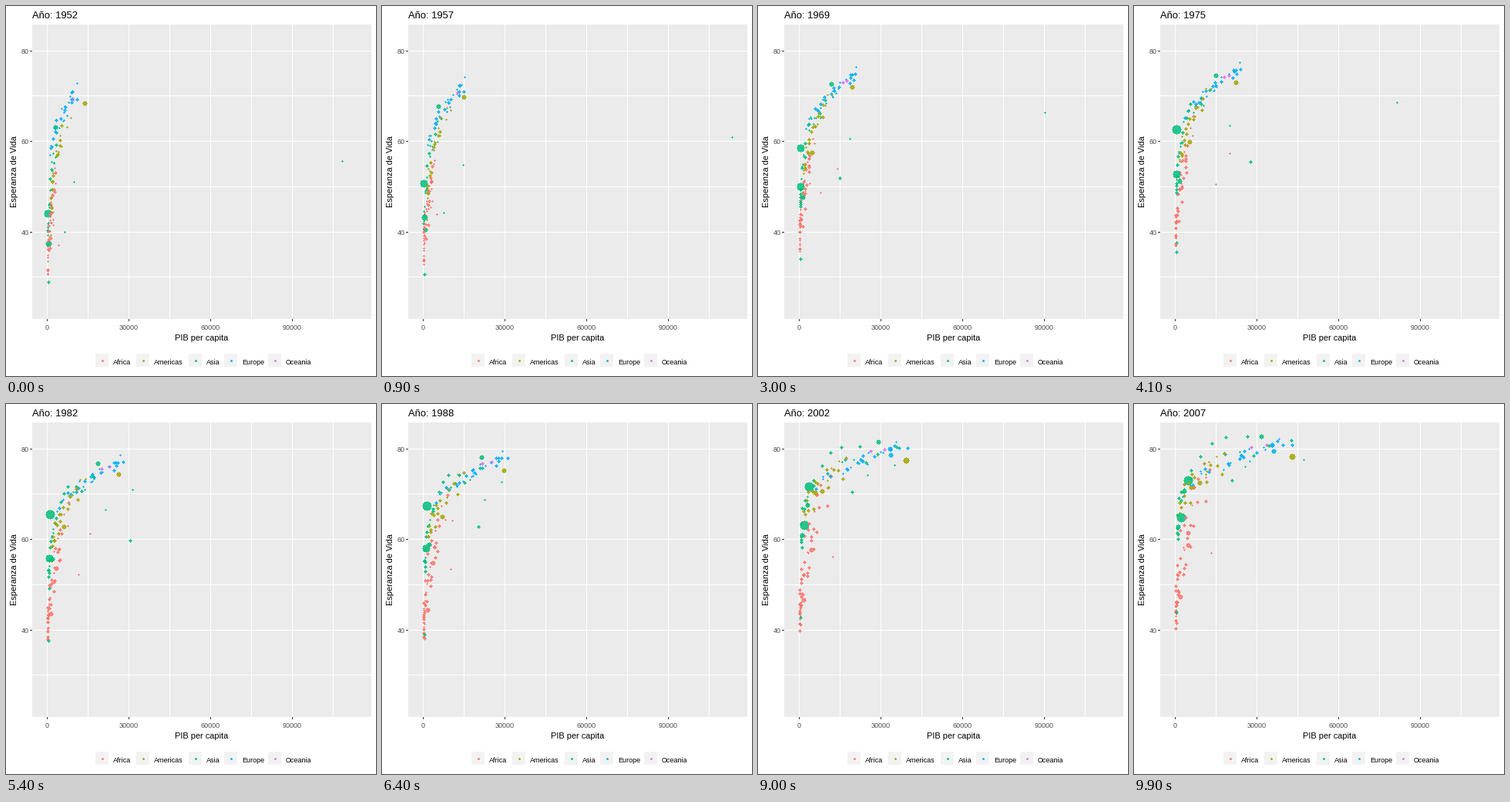
A matplotlib script for the animation above (10000 ms loop, 480 px wide and 480 px high).

```python
import numpy as np
import matplotlib.pyplot as plt
from matplotlib.animation import FuncAnimation
from matplotlib.patches import Rectangle

FRAMES = 100
T = np.linspace(0, 1, 12)  # 1952 to 2007 in five-year steps
COLORS = {"Africa": "#F8766D", "Americas": "#A3A500", "Asia": "#00BF7D",
          "Europe": "#00B0F6", "Oceania": "#E76BF3"}
rng = np.random.default_rng(7)
dots = []


def add(group, gdp, life, pop):
    """One dot: GDP in thousands, life expectancy, population in millions."""
    dots.append((group, gdp + 0 * T, life + 0 * T, pop + 0 * T))


def bump(at, width):
    return np.exp(-((T - at) / width) ** 2)


def crowd(group, n, start, end, ease, growth=.02, noise=1.3):
    """Rank n dots from poor to rich and ease each from its first to last place.

    start and end hold (gdp low, high, power, life low, high, power).
    """
    rank = (np.arange(n) + .5) / n

    def place(g0, g1, gp, l0, l1, lp):
        q = np.clip(rank + rng.normal(0, .05, n), 0, 1)
        gdp = (g0 + (g1 - g0) * q ** gp) * np.exp(rng.normal(0, .1, n))
        return gdp, l0 + (l1 - l0) * q ** lp + rng.normal(0, noise, n)

    pops = np.clip(np.exp(rng.normal(2, 1.2, n)), .2, 80)
    for g0, l0, g1, l1, pop in zip(*place(*start), *place(*end), pops):
        add(group, g0 * (g1 / g0) ** T ** ease[0], l0 + (l1 - l0) * T ** ease[1],
            pop * np.exp(growth * 55 * (T - .5)))


crowd("Oceania", 2, (10, 10.6, 1, 69, 69.4, 1), (24, 36, 1, 80, 81.2, 1), (.6, .9), noise=.1)

# Giants, oil states and crises move on paths of their own.
add("Asia", .4 + 4.5 * T ** 3, 44 + 29 * T ** .5 - 11.8 * bump(.182, .07), 556 + 763 * T ** .9)
add("Asia", .55 + 1.9 * T ** 2.5, 37.4 + 27.3 * T ** .65, 372 + 738 * T)
add("Asia", 3.2 + 28.5 * T, 63 + 19.6 * T ** .6, 86 + 41 * T)
add("Asia", .75 + 2.8 * T ** 1.2, 37.5 + 33 * T, 82 + 141 * T)
add("Asia", np.array([108.4, 113.5, 95.5, 80.9, 109.3, 59.3, 31.4, 28.1, 34.9, 40.3, 35.1, 47.3]),
    55.6 + 22 * T ** .6, .2 + 2.3 * T)
add("Asia", 6.5 + 14.5 * T + 21 * bump(.48, .13), 39.9 + 33 * T ** .85, 4 + 23 * T ** 1.5)
add("Asia", 9.9 + 16 * T ** .5, 51 + 25 * T ** .8, .4)
add("Asia", .8, 28.8 + 15 * T ** .9, 8 + 24 * T ** 2)
add("Asia", .4 + .8 * T, 40 + 20 * T - 18 * bump(.455, .06), 5 + 9 * T)
add("Americas", 14 + 29 * T ** 1.4, 68.4 + 9.8 * T ** .85, 157 + 144 * T)
add("Americas", 2.1 + 7 * T ** .8, 51 + 21.5 * T, 57 + 133 * T)
add("Africa", 2.4 + 9 * T + 15 * bump(.42, .17), 42.7 + 31 * T ** .85, 1 + 4 * T)
add("Africa", 4.3 + 9 * T + 10 * bump(.45, .08), 37 + 20 * T ** .45, .5 + T)
add("Africa", .5 + .35 * T, 40 + 6 * T - 20.8 * bump(.727, .07), 2.5 + 6.4 * T)
add("Africa", 1.1 + .9 * T, 36.3 + 11 * T ** .7, 33 + 102 * T)

crowd("Africa", 48, (.3, 3.5, 2.2, 34, 48, 1), (.4, 11, 3.2, 44, 72, 1.8), (.6, .7), .026, 3.5)
crowd("Americas", 23, (1.4, 8, 2, 40, 67, .8), (2, 20, 1.6, 66, 79, .8), (.65, .85))
crowd("Asia", 23, (.4, 4, 2, 37, 62, 1.1), (1, 42, 3.5, 60, 82, .8), (.8, .85), noise=2)
crowd("Europe", 30, (1, 11, 1.1, 54, 72, .6), (6, 42, .8, 72.5, 81, .6), (.55, .8), .004, .8)

# Mix the drawing order, keeping the first few at the back.
dots[3:] = [dots[i + 3] for i in rng.permutation(len(dots) - 3)]
GDP, LIFE, POP = (np.array([d[k] for d in dots]) for k in (1, 2, 3))
SIZE = 1 + 5 * np.sqrt(POP / 1319)


def px(gdp):
    return 34 + (gdp + 5.423) * 3.535


def py(life):
    return 293.05 + (40 - life) * 5.875


def area(size):
    """Marker area whose hard-edged disc spans a whole number of pixels."""
    radius = np.floor(.375 * (size * 2.845 + .945) + .24)
    return (2 * np.maximum(1, radius) - .9) ** 2


fig = plt.figure(figsize=(480 / 72, 480 / 72), dpi=72, facecolor="white")
ax = fig.add_axes([0, 0, 1, 1])
ax.set(xlim=(0, 480), ylim=(480, 0))
ax.axis("off")


def box(x, y, w, h, color):
    ax.add_patch(Rectangle((x, y), w, h, fc=color, lw=0, antialiased=False, zorder=1))


def label(x, y, text, size, color="black", **kw):
    return ax.text(x, y, text, fontsize=size, color=color, family="Liberation Sans", **kw)


def scatter(x, y, size, color):
    return ax.scatter(x, y, s=area(size), c=color, alpha=.85, lw=0,
                      antialiased=False, zorder=3)


box(34, 24, 440, 382, "#EBEBEB")
for g in range(0, 106, 15):
    x = int(px(g))
    box(x, 24, 1, 382, "white")
    if g % 30 == 0 and g < 100:
        box(x, 406, 1, 3, "#333333")
        label(x, 420, str(g * 1000), 9, "#4D4D4D", ha="center")
for e in range(30, 81, 10):
    y = int(py(e))
    box(34, y, 440, 1, "white")
    if e % 20 == 0:
        box(31, y, 3, 1, "#333333")
        label(29.5, y + 4, str(e), 9, "#4D4D4D", ha="right")

label(254, 434, "PIB per capita", 11, ha="center")
label(11, 215, "Esperanza de Vida", 11, ha="center", va="center", rotation=90)
title = label(34, 16, "", 13)

for x, (name, color) in zip((116, 169, 237, 283, 340), COLORS.items()):
    box(x, 451, 17, 17, "#F2F2F2")
    scatter([x + 8.5], [459.5], 1.5, color)
    label(x + 23, 465, name, 9)

points = scatter(0 * GDP[:, 0], 0 * GDP[:, 0], SIZE[:, 0], [COLORS[d[0]] for d in dots])


def update(frame):
    pos = frame * 11 / (FRAMES - 1)
    i = min(int(pos), 10)
    f = pos - i

    def at(table):
        return table[:, i] * (1 - f) + table[:, i + 1] * f

    xy = np.column_stack([px(at(GDP)), py(at(LIFE))])
    points.set_offsets(np.floor(xy) + .5)
    points.set_sizes(area(at(SIZE)))
    title.set_text(f"Año: {round(1952 + 5 * pos)}")
    return points, title


anim = FuncAnimation(fig, update, frames=FRAMES, interval=100, repeat=True,
                     repeat_delay=0, blit=False)
plt.show()
```
